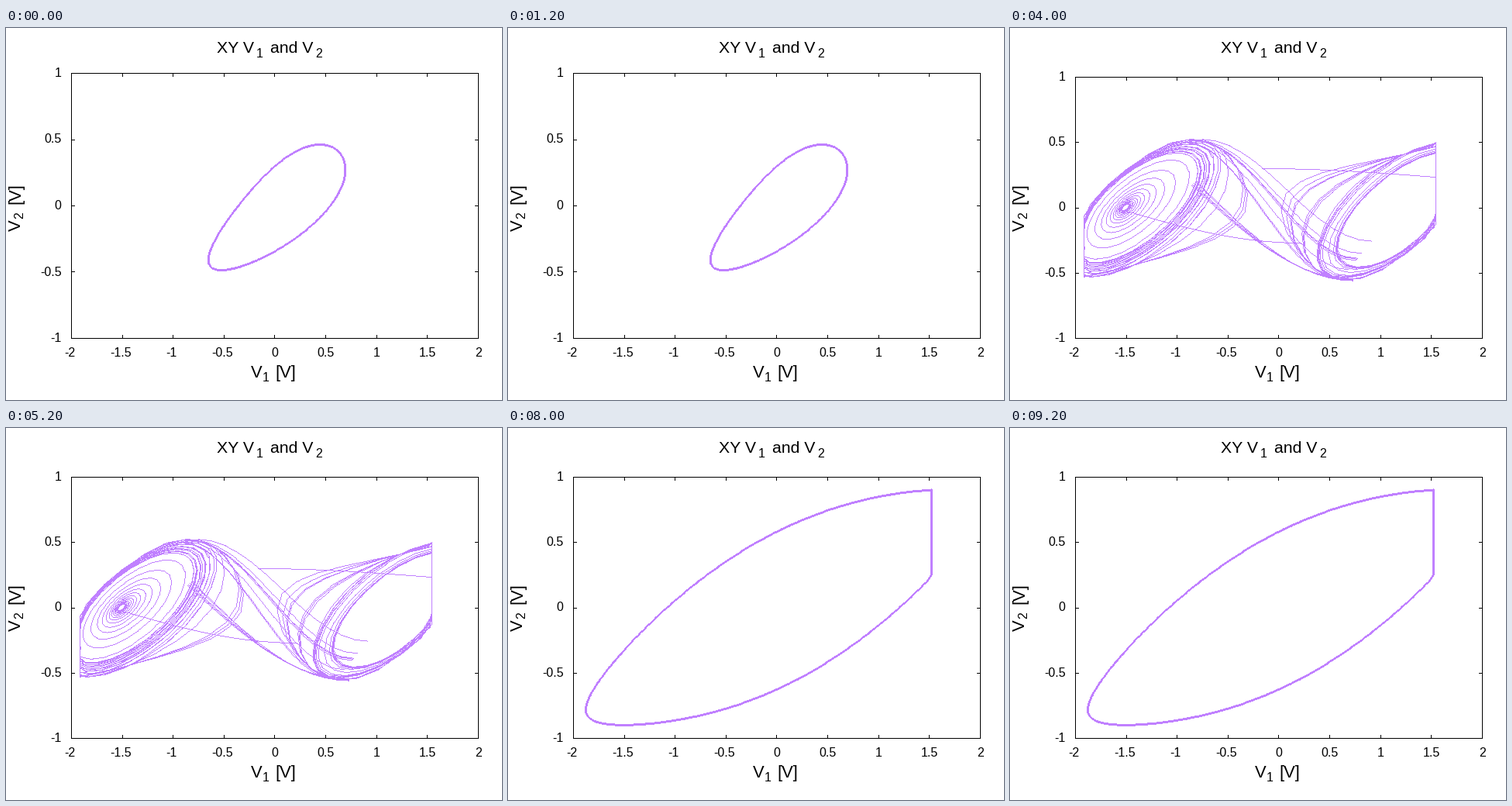
A matplotlib script that plays this animation: 640x480 px, repeating every 10000 ms.

```python
import matplotlib.pyplot as plt
import numpy as np
from matplotlib.animation import FuncAnimation

W, H, DPI = 640, 480, 100
LEFT, RIGHT, BOTTOM = 84, 609, 400
PURPLE, BLACK = (192, 128, 255), (0, 0, 0)
TITLE, LABEL, SUB, TICK = 21.3, 22, 16, 16
TAU = 2 * np.pi

plt.rcParams["font.family"] = "Liberation Sans"
fig = plt.figure(figsize=(W / DPI, H / DPI), dpi=DPI, facecolor="white")
ax = fig.add_axes([0, 0, 1, 1])
ax.axis("off")


def put(x, y, s, size, ha="left", rotation=0):
    return ax.text(x, y, s, fontsize=size * 72 / DPI, ha=ha, va="baseline",
                   rotation=rotation, rotation_mode="anchor")


def ink(canvas, curves, color):
    """Draw polylines with a hard one-pixel pen."""
    for curve in curves:
        for p, q in zip(curve[:-1], curve[1:]):
            steps = int(np.abs(np.subtract(q, p)).max()) + 2
            x, y = np.rint(np.linspace(p, q, steps)).astype(int).T
            canvas[y, x] = color


def loop(theta, cx, cy, a, b, phi, lag=0, p=0, q=0, c=0):
    """Phase-shifted ellipse; lag delays its right side, p, q, c bend it."""
    u = theta - np.radians(phi + lag * ((1 + np.cos(theta)) / 2) ** 2)
    x = cx + a * np.cos(theta) + p * np.cos(2 * theta) + q * np.sin(2 * theta)
    y = cy - b * np.cos(u) + c * np.cos(3 * u)
    return np.column_stack([x, y])


def orbit(keys, levels, step=0.043):
    """Clockwise turns; levels picks the blend of key loops at each start."""
    levels = np.asarray(levels)
    t = np.arange(0, len(levels) - 1, step)
    k = t.astype(int)
    u = t - k
    a, b = levels[k], levels[k + 1]
    fold = np.clip((u - 0.68) / 0.25, 0, 1)
    fold = fold * fold * (3 - 2 * fold)
    level = a + (b - a) * np.where(b < a, fold, u)
    shape = [np.interp(level, range(len(keys)), values)
             for values in zip(*keys)]
    return loop(np.radians(200) - TAU * t, *shape)


def cross(start, end, bend=np.pi):
    """Eased run between two points: pi eases both ends, pi / 2 the last."""
    s = np.linspace(0, 1, 14)
    if bend == np.pi:
        ease = (1 - np.cos(np.pi * s)) / 2
    else:
        ease = np.sin(bend * s)
    (x0, y0), (x1, y1) = start, end
    return np.column_stack([x0 + (x1 - x0) * s, y0 + (y1 - y0) * ease])


def mirror(curves, span):
    return [np.array(span) - c for c in curves]


def clip_x(curves, low, high):
    return [np.column_stack([np.clip(c[:, 0], low, high), c[:, 1]])
            for c in curves]


def thick(curve):
    return [curve + d for d in ((0, 0), (1, 0), (-1, 0), (0, 1), (0, -1))]


def limit_cycle():
    return thick(loop(np.linspace(0, TAU, 120), 349, 231, 87, 81, 43, q=-8))


def single_scroll():
    rng = np.random.default_rng(4)
    keys = [(324, 232, 5, 8, 50, 0, 0, 0),
            (350, 232, 98, 81, 50, 0, 0, -7),
            (372, 232, 156, 91, 38, 55, 20, -15)]
    levels = [0.02]
    for _ in range(100):
        a = levels[-1]
        if a < 1:
            a = a * 1.14 + 0.02
        elif a < 1.32:
            a = 2 - 0.96 * rng.random() ** 1.4
        else:
            a = rng.uniform(0.08, 1.24)
        levels.append(a)
    return clip_x([orbit(keys, levels)], 236, 549)


def clipped_double_scroll():
    rng = np.random.default_rng(7)
    keys = [(148, 231, 2, 2, 48, 0, 0, 0),
            (163, 230, 77, 69, 48, 0, 0, 0),
            (173, 232, 100, 89, 48, 0, 0, 0),
            (190, 232, 128, 89, 38, 55, 12, -12)]
    left = [orbit(keys, np.geomspace(0.03, 1, 15))]
    left += [orbit(keys, np.geomspace(a, rng.uniform(1.8, 3), 5))
             for a in rng.uniform(0.85, 1.1, 5)]
    right = [orbit(keys, np.linspace(a, rng.uniform(2.4, 3.1), 4))
             for a in rng.uniform(0.55, 1.3, 7)]
    curves = left + mirror(right, (667, 468))

    for u in rng.random(9):
        curves.append(cross((225 + 25 * u, 147 - 4 * u),
                            (425 + 45 * u, 325 - 55 * u)))
    for d in rng.uniform(-4, 3, 6):
        curves.append(cross((238 + d, 199 - d), (442, 325 + d / 3),
                            np.pi / 2))
    curves.append(cross((548, 192), (325, 181), np.pi / 2))
    curves.append(cross((150, 236), (375, 277), np.pi / 2))
    return clip_x(curves, 95, 549)


def double_scroll():
    rng = np.random.default_rng(11)
    keys = [(240, 231, 3, 3, 48, 0, 0),
            (241, 234, 51, 36, 48, 0, 0),
            (252, 229, 82, 44, 40, 45, 8)]
    hull = [(353, 234, 174, 65, 61, 0, 0, 0, 10.8),
            (353, 234, 165, 55, 61, 0, 0, 0, 8)]

    def half():
        curves = [orbit(keys, np.geomspace(a, rng.uniform(1.3, 2), 6))
                  for a in rng.uniform(0.12, 0.8, 5)]
        for d in rng.uniform(-4, 4, 4):
            curves.append(cross((250 + d, 237 + d / 2), (400 + d, 277 + d)))
        return curves

    return (half() + mirror(half(), (706, 466))
            + [orbit(hull, rng.random(11) ** 1.5)])


def saturated_cycle():
    cycle = loop(np.linspace(0, TAU, 160), 355, 231, 255, 160, 36, c=8.2)
    return thick(clip_x([cycle], 99, 546)[0])


def frame_lines(top):
    """Border and inward ticks on all four sides."""
    lines = [[(LEFT, top), (RIGHT, top), (RIGHT, BOTTOM), (LEFT, BOTTOM),
              (LEFT, top)]]
    for x in np.linspace(LEFT, RIGHT, 9):
        lines += [[(x, top), (x, top + 4)], [(x, BOTTOM), (x, BOTTOM - 4)]]
    for y in np.linspace(top, BOTTOM, 5):
        lines += [[(LEFT, y), (LEFT + 4, y)], [(RIGHT, y), (RIGHT - 4, y)]]
    return lines


def scene(top, curves):
    canvas = np.full((H, W, 3), 255, np.uint8)
    ink(canvas, curves, PURPLE)
    ink(canvas, frame_lines(top), BLACK)
    return top, canvas


put(272, 32, "XY V", TITLE)
put(322, 37, "1", SUB)
put(340.5, 32, "and V", TITLE)
put(398.5, 37, "2", SUB)
put(315.5, 450.5, "V", LABEL)
put(330, 456, "1", SUB)
put(346.5, 450.5, "[V]", LABEL)
put(18, 261, "V", LABEL, rotation=90)
put(22, 246, "2", SUB, rotation=90)
put(18, 226.5, "[V]", LABEL, rotation=90)

for v, x in zip(np.linspace(-2, 2, 9), np.linspace(LEFT, RIGHT, 9)):
    put(x - 2 * (v < 0), 423, f"{v:g}", TICK, "center")
y_labels = [put(71, 0, f"{v:g}", TICK, "right")
            for v in np.linspace(1, -1, 5)]

SCENES = [scene(58, limit_cycle()), scene(63, single_scroll()),
          scene(63, clipped_double_scroll()), scene(63, double_scroll()),
          scene(63, saturated_cycle())]

plot = ax.imshow(SCENES[0][1], extent=(-0.5, W - 0.5, H - 0.5, -0.5),
                 interpolation="nearest", aspect="auto")


def draw(i):
    top, canvas = SCENES[i]
    plot.set_data(canvas)
    for label, y in zip(y_labels, np.linspace(top, BOTTOM, 5)):
        label.set_y(y + 4.5)
    return [plot, *y_labels]


anim = FuncAnimation(fig, draw, frames=len(SCENES), interval=2000,
                     repeat=True, repeat_delay=0)
plt.show()
```
